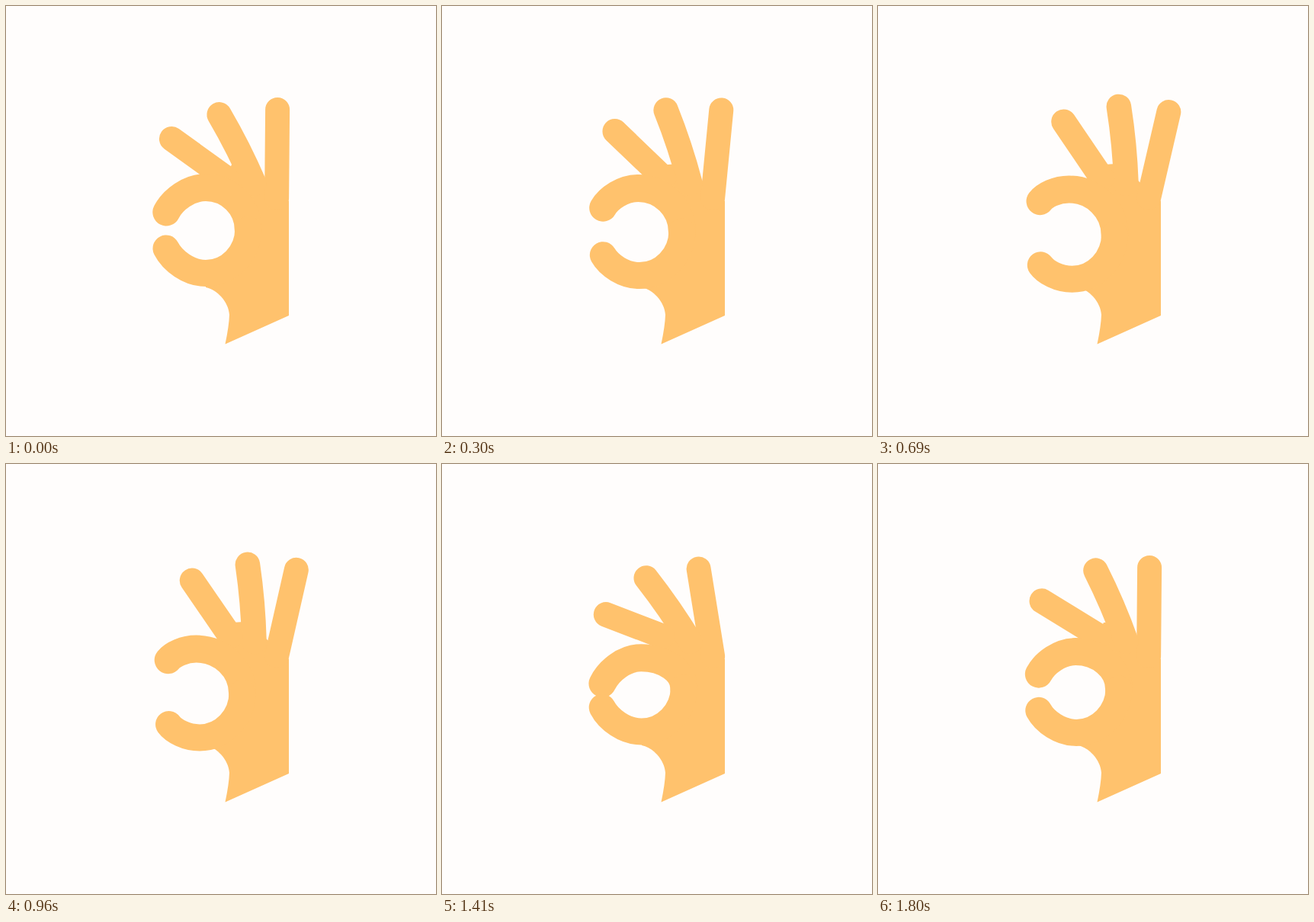
Animation, 564 px wide and 564 px high, one loop 2800 ms. Source, as an HTML page:

```html
<!DOCTYPE html>
<html lang="en">
<head>
<meta charset="utf-8">
<title>Hand</title>
<style>
  html, body { margin: 0; width: 100%; height: 100%; overflow: hidden; background: #fffdfc; }
  svg { display: block; width: 100%; height: 100%; }
  path { fill: none; stroke: #ffc26d; stroke-linecap: round; stroke-linejoin: round; }
  #palm { fill: #ffc26d; stroke: none; }
</style>
</head>
<body>
<svg viewBox="0 0 564 564">
  <path id="palm" d="M371 406 L287.5 443.5 Q292.5 420 293 405 C292 388 277 372 262 369 L262 360
    L310 325 L308 285 L296 250 L285 230 L296 208 L312 207 L341 229 L371 256 Z"/>
  <path id="pinky" stroke-width="32"/>
  <path id="ring" stroke-width="32.6"/>
  <path id="middle" stroke-width="32.6"/>
  <path id="index" stroke-width="36"/>
  <path id="thumb" stroke-width="35"/>
</svg>
<script>
const LOOP = 2800, STEP = 30;
const OPEN_AT = 825, PINCH_AT = 1425, STOP_AT = 1800;

// Finger angles in degrees from upright, middle finger length,
// how far the grip is open and how far the index finger dips
const rest  = { pinky: 0.5,  ring: -26.8, middle: -54.2, reach: 88.5, open: 0,    dip: 0 };
const wide  = { pinky: 15.8, ring: -0.8,  middle: -29.8, reach: 90,   open: 1,    dip: 0 };
const pinch = { pinky: -9.2, ring: -34.7, middle: -69,   reach: 79.5, open: 0.05, dip: 16 };
const last  = { pinky: 0.5,  ring: -23.2, middle: -58.4, reach: 88.5, open: 0.2,  dip: 7.5 };

const mix = (a, b, u) => a + (b - a) * u;
const blend = (from, to, u) =>
  Object.fromEntries(Object.keys(from).map(key => [key, mix(from[key], to[key], u)]));

function poseAt(t) {
  if (t < OPEN_AT) return blend(rest, wide, (t / OPEN_AT) ** 1.1);
  if (t < PINCH_AT) {
    const u = (t - OPEN_AT) / (PINCH_AT - OPEN_AT);
    return blend(wide, pinch, (1 - Math.cos(Math.PI * u)) / 2);
  }
  const u = (t - PINCH_AT) / (STOP_AT - PINCH_AT);
  return blend(pinch, last, 1 - Math.cos(Math.PI / 2 * u));
}

const setPath = (id, d) => document.getElementById(id).setAttribute('d', d);

// A finger turned about its knuckle, bowed slightly to the right
function finger(x, y, length, degrees, bow = 0) {
  const angle = degrees * Math.PI / 180;
  const tipX = x + length * Math.sin(angle), tipY = y - length * Math.cos(angle);
  return `M${tipX} ${tipY} Q${(x + tipX) / 2 + bow} ${(y + tipY) / 2 - bow / 3} ${x} ${y}`;
}

// Curls from the tip over its crest and on to the palm wall
function curl(tipX, tipY, topX, topY, wallX, wallY) {
  const dx = topX - tipX, dy = topY - tipY;
  return `M${tipX} ${tipY} C${tipX + 0.16 * dx} ${tipY + 0.5 * dy} ${topX - 0.43 * dx} ${topY} ${topX} ${topY}`
    + ` C${mix(topX, wallX, 0.55)} ${topY} ${wallX} ${mix(wallY, topY, 0.55)} ${wallX} ${wallY}`;
}

function draw(t) {
  const { pinky, ring, middle, reach, open, dip } = poseAt(t);
  const crestX = mix(262, 248, open), wallX = mix(317.7, 309, open), wallY = mix(293, 301, open);
  setPath('pinky', finger(355.1, 252, 116, pinky));
  setPath('ring', finger(325.5, 233, 101.5, ring, 3));
  setPath('middle', finger(289 + 6 * open, 226, reach, middle));
  setPath('index', curl(210.3 + 2.7 * open, 270.5 - 17.5 * open + 1.15 * dip,
    crestX, 238 + 3 * open + dip, wallX, wallY));
  setPath('thumb', curl(210 + 4 * open, 318 + 26.5 * open,
    crestX + 5 * open, 350.5 + 9.5 * open, wallX, wallY));
}

function tick() {
  const t = Math.min(performance.now() % LOOP, STOP_AT);
  draw(Math.floor(t / STEP) * STEP);
  requestAnimationFrame(tick);
}
tick();
</script>
</body>
</html>
```
